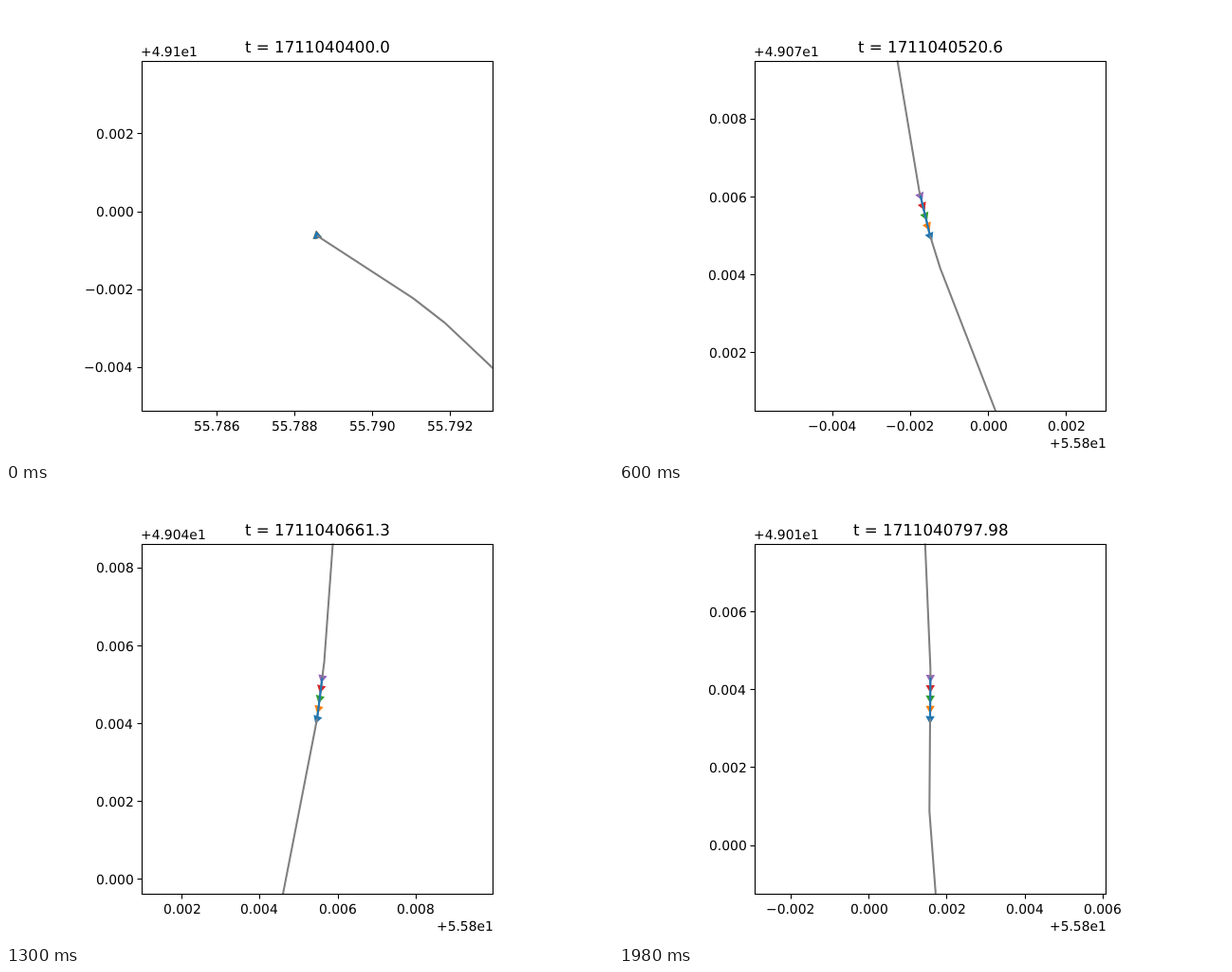
Animation, 640 px wide and 480 px high, one loop 2000 ms. Source, as an HTML page with a canvas:

```html
<!DOCTYPE html>
<html lang="en">
<head>
<meta charset="utf-8">
<title>Route plot</title>
<style>
html, body { margin: 0; width: 100%; height: 100%; overflow: hidden; background: #fff; }
canvas { display: block; }
</style>
</head>
<body>
<canvas id="plot" width="640" height="480"></canvas>
<script>
const ctx = document.getElementById('plot').getContext('2d');
ctx.textRendering = 'geometricPrecision';

const FRAME_MS = 20, FRAMES = 100;
const BOX = { left: 143.2, right: 512.8, top: 57.6, bottom: 427.2 };
const CX = 328, CY = 242.4;
const HALF = 0.0045, STEP = 0.002;
const SCALE = (BOX.right - BOX.left) / (2 * HALF);
const X0 = 55.78, Y0 = 49, UNIT = 1e-5;
const COLORS = ['#1f77b4', '#ff7f0e', '#2ca02c', '#d62728', '#9467bd'];
const SPEED = 92.09;   // units per frame
const CAR_GAP = 26.5;
const SQUEEZE = 0.562; // metric ratio of the two axes, used for headings

// Bends of the route; everything moves along it at constant speed.
const BENDS = [
  [858, 9937], [1104, 9777], [1184, 9715], [1250, 9653], [1326, 9581], [1421, 9462],
  [1480, 9373], [1514, 9296], [1536, 9235], [1563, 9132], [1602, 8936], [1823, 7615],
  [1851, 7499], [1877, 7416], [2465, 5898], [2524, 5740], [2560, 5600], [2590, 5450],
  [2610, 5200], [2588, 4863], [2566, 4559], [2548, 4414], [2372, 3510], [2323, 3298],
  [2264.5, 3061], [2172, 2612], [2148, 2495], [2130, 2370], [2124, 2200], [2131, 1990],
  [2145, 1773], [2158.6, 1452], [2156, 1087], [2172, 875], [2185, 760],
];

let length = 0;
const route = BENDS.map(([x, y], i) => {
  if (i) length += Math.hypot(x - BENDS[i - 1][0], y - BENDS[i - 1][1]);
  return { x, y, s: length };
});

function locate(dist) {
  const s = Math.max(0, dist);
  const i = route.findIndex(p => p.s > s);
  const a = route[i - 1], b = route[i];
  const f = (s - a.s) / (b.s - a.s);
  return {
    x: a.x + (b.x - a.x) * f,
    y: a.y + (b.y - a.y) * f,
    heading: Math.atan2((b.y - a.y) * SQUEEZE, b.x - a.x),
  };
}

const floorDiv = (a, b) => Math.round((a - a % b) / b);

function ticksFor(mid) {
  const min = mid - HALF, max = mid + HALF;
  const base = floorDiv(min - 10, STEP) * STEP;
  const ticks = [];
  for (let i = 0; i < 7; i++) {
    const v = i * STEP + base + 10;
    if (v >= min && v <= max) ticks.push(v);
  }
  return ticks;
}

// Common part pulled out of the tick labels, or 0 when they stay whole.
function offsetFor(ticks) {
  const lo = ticks[0], hi = ticks[ticks.length - 1];
  const power = e => Number('1e' + e);
  const spread = e => floorDiv(hi, power(e)) - floorDiv(lo, power(e));
  const firstAbove = limit => {
    let e = 2;
    while (spread(e) <= limit) e--;
    return e + 1;
  };
  let e = firstAbove(0);
  if ((hi - lo) / power(e) <= 0.01) e = firstAbove(1);
  const count = floorDiv(hi, power(e));
  return count >= 1000 ? count * power(e) : 0;
}

function label(v) {
  if (Math.abs(v) < 1e-8) v = 0;
  return v.toFixed(3).replace('-', '\u2212');
}

const offsetLabel = v => '+' + Number((v / 10).toFixed(4)) + 'e1';

// Aligns the inked part (0 left, 0.5 centre, 1 right) on whole pixels.
function text(str, x, y, align, size = 13.889) {
  ctx.font = size + 'px "DejaVu Sans", sans-serif';
  const m = ctx.measureText(str);
  const ink = m.actualBoundingBoxLeft + m.actualBoundingBoxRight;
  const left = Math.round(x - ink * align);
  ctx.fillText(str, left + m.actualBoundingBoxLeft, Math.round(y));
}

function polyline(points, color, width) {
  ctx.beginPath();
  for (const [x, y] of points) ctx.lineTo(x, y);
  ctx.strokeStyle = color;
  ctx.lineWidth = width;
  ctx.stroke();
}

function triangle([x, y], heading, color) {
  const r = 5.55;
  ctx.beginPath();
  for (let k = 0; k < 3; k++) {
    const a = heading + k * 2 * Math.PI / 3;
    ctx.lineTo(x + r * Math.cos(a), y - r * Math.sin(a));
  }
  ctx.fillStyle = color;
  ctx.fill();
}

function drawAxes(midX, midY) {
  const snap = v => Math.round(v) + 0.5;
  ctx.fillStyle = '#000';

  const xs = ticksFor(midX), xOff = offsetFor(xs);
  for (const v of xs) {
    const x = CX + (v - midX) * SCALE;
    polyline([[snap(x), 427.5], [snap(x), 432.5]], '#000', 1.11);
    text(label(v - xOff), x, 448, 0.5);
  }
  if (xOff) text(offsetLabel(xOff), BOX.right, 466, 1);

  const ys = ticksFor(midY), yOff = offsetFor(ys);
  for (const v of ys) {
    const y = CY - (v - midY) * SCALE;
    polyline([[138.5, snap(y)], [143.5, snap(y)]], '#000', 1.11);
    text(label(v - yOff), 133.5, y + 5.5, 1);
  }
  if (yOff) text(offsetLabel(yOff), BOX.left, 53, 0);

  ctx.strokeRect(143.5, 58.5, 370, 369);
}

function draw(n) {
  const s = n * SPEED;
  const cars = COLORS.map((color, i) => ({ color, ...locate(s - i * CAR_GAP) }));
  const head = cars[0];
  const toPx = p => [CX + (p.x - head.x) * UNIT * SCALE, CY - (p.y - head.y) * UNIT * SCALE];

  ctx.fillStyle = '#fff';
  ctx.fillRect(0, 0, 640, 480);

  ctx.save();
  ctx.beginPath();
  ctx.rect(BOX.left, BOX.top, BOX.right - BOX.left, BOX.bottom - BOX.top);
  ctx.clip();
  ctx.lineJoin = 'round';
  for (const car of [...cars].reverse()) triangle(toPx(car), car.heading, car.color);
  polyline(route.map(toPx), '#808080', 2.08);
  if (n) polyline(cars.map(toPx), COLORS[0], 2.08);
  ctx.restore();

  drawAxes(X0 + head.x * UNIT, Y0 + head.y * UNIT);

  const stamp = Number((1711040400 + 4.02 * n).toFixed(2));
  text('t = ' + (Number.isInteger(stamp) ? stamp + '.0' : stamp), CX, 49, 0.5, 16.667);
}

const began = performance.now();
function loop() {
  draw(Math.floor((performance.now() - began) / FRAME_MS) % FRAMES);
  requestAnimationFrame(loop);
}
loop();
</script>
</body>
</html>
```
